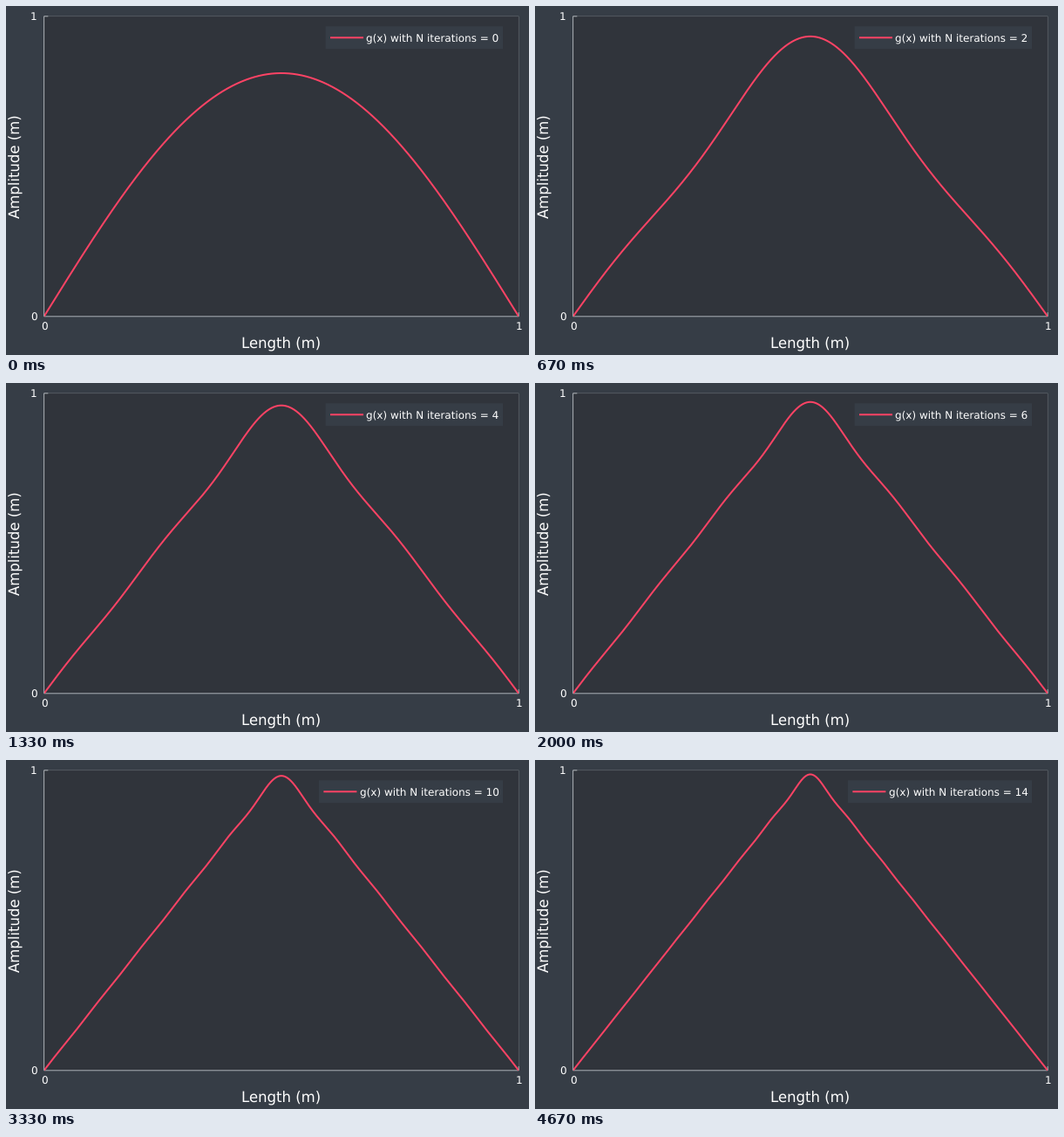
Animation, 600 px wide and 400 px high, one loop 5010 ms. Source, as a matplotlib script:

```python
import matplotlib.pyplot as plt
import numpy as np
from matplotlib.animation import FuncAnimation
from matplotlib.patches import Rectangle

plt.rcParams["font.family"] = "DejaVu Sans"
plt.rcParams["text.hinting"] = "none"

W, H, DPI = 600, 400, 100
LEFT, RIGHT, TOP, BOTTOM = 43.6, 588.19, 11.81, 355.8
BACKGROUND, PANEL, AXIS, CURVE = "#363D46", "#30343B", "#ADB2B7", "#FE4365"
SMALL, LARGE = 12, 16.5
DIGIT_WIDTH = 0.636 * SMALL
TICK = 4.72
LEGEND_LEFT, LEGEND_RIGHT, LEGEND_TOP, LEGEND_HEIGHT = 366.6, 570, 23.3, 25.9
KEY_START, KEY_END = 372, 410
KEY_Y = LEGEND_TOP + LEGEND_HEIGHT / 2
FRAMES, INTERVAL = 167, 30
LAST = 14


def pt(pixels):
    return pixels * 72 / DPI


fig = plt.figure(figsize=(W / DPI, H / DPI), dpi=DPI, facecolor=BACKGROUND)
ax = fig.add_axes([0, 0, 1, 1])
ax.set(xlim=(0, W), ylim=(H, 0))
ax.axis("off")


def box(x, y, w, h, color, z):
    return ax.add_patch(Rectangle((x, y), w, h, facecolor=color, linewidth=0,
                                  zorder=z, snap=False))


def line(xs, ys, color, width, z, alpha=1):
    return ax.plot(xs, ys, color=color, lw=pt(width), zorder=z, alpha=alpha,
                   solid_capstyle="butt", snap=False)[0]


def label(x, y, text, size, ha="center", **options):
    return ax.text(x, y, text, color="white", fontsize=pt(size), ha=ha,
                   va="baseline", zorder=6, **options)


panel = box(LEFT, TOP, RIGHT - LEFT, BOTTOM - TOP, PANEL, 0)

# Faint far borders, main axes and inward ticks
line([LEFT, RIGHT], [TOP, TOP], AXIS, 0.5, 1, 0.5)
line([RIGHT, RIGHT], [TOP, BOTTOM], AXIS, 0.5, 1, 0.5)
line([LEFT, LEFT], [TOP, BOTTOM], AXIS, 1, 2)
line([LEFT, RIGHT], [BOTTOM, BOTTOM], AXIS, 1, 2)
line([LEFT, LEFT + TICK], [TOP, TOP], AXIS, 1, 2)
line([RIGHT, RIGHT], [BOTTOM, BOTTOM - TICK], AXIS, 1, 2)

label(LEFT, 371.4, "0", SMALL)
label(RIGHT, 371.4, "1", SMALL)
label(35.4, 361, "0", SMALL, "right")
label(35.4, 16.2, "1", SMALL, "right")
label((LEFT + RIGHT) / 2, 392, "Length (m)", LARGE)
label(16, (TOP + BOTTOM) / 2, "Amplitude (m)", LARGE, rotation=90, rotation_mode="anchor")

x = np.linspace(0, 1, 1001)
curve = line(LEFT + x * (RIGHT - LEFT), np.full_like(x, BOTTOM), CURVE, 2, 3)
curve.set_clip_path(panel)

legend_box = box(LEGEND_LEFT, LEGEND_TOP, LEGEND_RIGHT - LEGEND_LEFT, LEGEND_HEIGHT,
                 BACKGROUND, 4)
legend_line = line([KEY_START, KEY_END], [KEY_Y, KEY_Y], CURVE, 2, 5)
legend_text = label(565.6, KEY_Y + 4.32, "", SMALL, "right")


def triangle_series(n):
    k = np.arange(n + 1)[:, None]
    odd = 2 * k + 1
    return 8 / np.pi**2 * np.sum((-1.0) ** k * np.sin(odd * np.pi * x) / odd**2, axis=0)


def update(frame):
    # Three steps a second; the offset absorbs the coarse frame clock
    n = min(3 * (frame * INTERVAL + 26) // 1000, LAST)
    curve.set_ydata(BOTTOM - triangle_series(n) * (BOTTOM - TOP))
    shift = DIGIT_WIDTH * (len(str(n)) - 1)
    legend_box.set_x(LEGEND_LEFT - shift)
    legend_box.set_width(LEGEND_RIGHT - LEGEND_LEFT + shift)
    legend_line.set_xdata([KEY_START - shift, KEY_END - shift])
    legend_text.set_text(f"g(x) with N iterations = {n}")
    return curve, legend_box, legend_line, legend_text


anim = FuncAnimation(fig, update, frames=FRAMES, interval=INTERVAL, repeat=True, repeat_delay=0)
plt.show()
```
